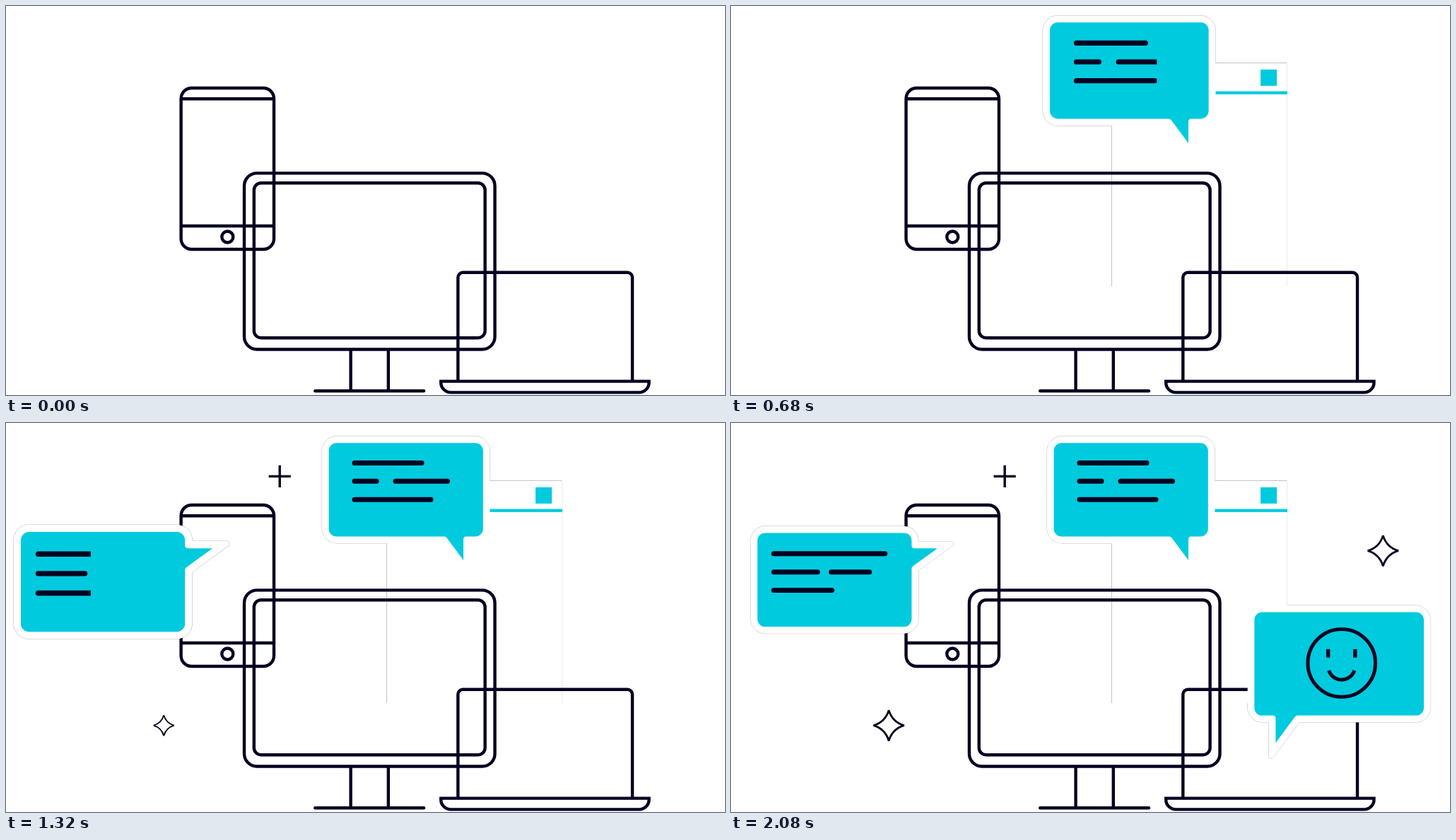
Animation, 1017 px wide and 550 px high, one loop 6680 ms. Source, as an HTML page with a canvas:

```html
<!DOCTYPE html>
<html lang="en">
<head>
<meta charset="utf-8">
<title>Devices and messages</title>
<style>
html, body { margin: 0; width: 100%; height: 100%; overflow: hidden; background: #fff; }
canvas { display: block; }
</style>
</head>
<body>
<canvas id="stage" width="1017" height="550"></canvas>
<script>
const W = 1017, H = 550, LOOP = 6680, STEP = 40;
const INK = '#050020', CYAN = '#00cade', EDGE = 'rgba(0,0,0,.27)';
const BOLD = 4.4, TEXT = 7, RIM = 9.6, PITCH = 25.9;
const PANEL = { x: 538, w: 249, h: 317, rest: 81, high: 69, floor: 396 };
const ctx = document.getElementById('stage').getContext('2d');

const clamp = u => Math.min(1, Math.max(0, u));
const ramp = (t, a, b) => clamp((t - a) / (b - a));
const smooth = u => u * u * (3 - 2 * u);
const easeOut = u => 1 - Math.pow(1 - u, 2.4);
const mix = (a, b, u) => a + (b - a) * u;

// Eases from `from` to `over`, then settles at `to`.
function overshoot(t, start, rise, fall, from, over, to) {
  const peak = start + rise;
  return t < peak ? mix(from, over, easeOut(ramp(t, start, peak)))
                  : mix(over, to, smooth(ramp(t, peak, peak + fall)));
}
const popBubble = (t, start) => overshoot(t, start, 240, 200, 0, 1.084, 1);
const popSpark = (t, start, over) => overshoot(t, start, 135, 120, 0, over, 1);

function pen(width, cap = 'butt', join = 'miter') {
  ctx.strokeStyle = INK;
  ctx.lineWidth = width;
  ctx.lineCap = cap;
  ctx.lineJoin = join;
}

function line(x1, y1, x2, y2) {
  ctx.beginPath();
  ctx.moveTo(x1, y1);
  ctx.lineTo(x2, y2);
  ctx.stroke();
}

function arc(x, y, r, from = 0, to = 2 * Math.PI) {
  ctx.beginPath();
  ctx.arc(x, y, r, from, to);
  ctx.stroke();
}

function box(x, y, w, h, r) {
  ctx.beginPath();
  ctx.roundRect(x, y, w, h, r);
  ctx.stroke();
}

function scaled(x, y, s, draw) {
  if (s <= 0) return;
  ctx.save();
  ctx.translate(x, y);
  ctx.scale(s, s);
  ctx.translate(-x, -y);
  draw();
  ctx.restore();
}

function drawPanel(top) {
  const { x, w, h, floor } = PANEL;
  ctx.save();
  ctx.beginPath();
  ctx.rect(0, 0, W, floor);
  ctx.clip();
  ctx.fillStyle = '#c4c4c4';
  ctx.fillRect(x, top, 1, h);
  ctx.fillRect(x, top, w, 1);
  ctx.fillStyle = '#ebebeb';
  ctx.fillRect(x + w - 1, top, 1, h);
  ctx.fillRect(x, top + h - 1, w, 1);
  ctx.fillStyle = CYAN;
  ctx.fillRect(x, top + 40.6, w, 4.3);
  ctx.fillRect(749, top + 9.9, 23, 23);
  ctx.restore();
}

function drawPhone(t) {
  const hop = 7 * smooth(ramp(t, 900, 1040)) * (1 - smooth(ramp(t, 1040, 1180)));
  const x = 247.6, w = 131.4, y = 116 - hop;
  pen(BOLD);
  box(x, y, w, 228, 15);
  for (const dy of [15.2, 195]) line(x, y + dy, x + w, y + dy);
  arc(x + w / 2, y + 210.5, 8);
}

function drawMonitor() {
  pen(BOLD);
  box(337, 236.4, 354.5, 249.1, 18);
  box(350.8, 250.2, 326.8, 219, 10);
  for (const x of [487.6, 540.8]) line(x, 485, x, 544);
  pen(BOLD, 'round');
  line(437.3, 544.2, 591, 544.2);
}

function drawLaptop() {
  const base = 530.6;
  pen(BOLD);
  ctx.beginPath();
  ctx.moveTo(639.3, base);
  ctx.arcTo(639.3, 376.8, 886, 376.8, 7);
  ctx.arcTo(886, 376.8, 886, base, 7);
  ctx.lineTo(886, base);
  ctx.stroke();
  box(615.2, base, 294.3, 15.8, [0, 0, 14, 14]);
}

// `root` is where the slanted side of the tail meets the box.
// Rows alternate dash and gap lengths.
const bubbles = [
  { start: 320, box: [456.6, 28.2, 674.8, 160.4], tip: [647, 194], root: 622,
    text: [489.5, 56.4], rows: [[102], [38, 20, 80.5], [115]] },
  { start: 1125, box: [37.4, 155.4, 255.5, 288.1], tip: [292, 177.2], root: 203.8, side: 'right',
    text: [57, 184.8], rows: [[164.3], [69, 12.3, 61], [89.2]] },
  { start: 1423, box: [740.3, 267.6, 980, 413.6], tip: [770.4, 452.3], root: 799,
    text: [0, 0], rows: [] }
];
const BODY_RADIUS = { box: 11, root: 4, tip: 0 };
const RIM_RADIUS = { box: 21, root: 1, tip: 3.5 };

function outline({ box: [l, t, r, b], tip: [x, y], root, side }) {
  const right = side === 'right';
  const tail = right ? [[r, y, 'root'], [x, y, 'tip'], [r, root, 'root']]
                     : [[x, b, 'root'], [x, y, 'tip'], [root, b, 'root']];
  if (!right && root > x) tail.reverse();
  const pts = [[l, t, 'box'], [r, t, 'box'], [r, b, 'box'], [l, b, 'box']];
  pts.splice(right ? 2 : 3, 0, ...tail);
  return pts;
}

// Moves every side of a clockwise polygon outward by d.
function grow(pts, d) {
  const n = pts.length;
  const normals = pts.map(([x, y], i) => {
    const [nx, ny] = pts[(i + 1) % n];
    const len = Math.hypot(nx - x, ny - y);
    return [(ny - y) / len, (x - nx) / len];
  });
  return pts.map(([x, y, kind], i) => {
    const [ax, ay] = normals[(i + n - 1) % n], [bx, by] = normals[i];
    const k = d / (1 + ax * bx + ay * by);
    return [x + k * (ax + bx), y + k * (ay + by), kind];
  });
}

function trace(pts, radius) {
  const n = pts.length, a = pts[0], z = pts[n - 1];
  ctx.beginPath();
  ctx.moveTo((a[0] + z[0]) / 2, (a[1] + z[1]) / 2);
  pts.forEach(([x, y, kind], i) => {
    const q = pts[(i + 1) % n];
    ctx.arcTo(x, y, q[0], q[1], radius[kind]);
  });
  ctx.closePath();
}

function drawText({ text: [x, y], rows, start }, t) {
  const widths = rows.map(row => row.reduce((a, b) => a + b, 0));
  ctx.beginPath();
  ctx.rect(0, 0, x + (Math.max(0, ...widths) + 1) * ramp(t, start, start + 440), H);
  ctx.clip();
  pen(TEXT, 'round');
  rows.forEach((row, i) => {
    let at = x;
    row.forEach((len, j) => {
      const ly = y + i * PITCH;
      if (j % 2 === 0) line(at + TEXT / 2, ly, at + len - TEXT / 2, ly);
      at += len;
    });
  });
}

function drawBubble(t, b, top) {
  const s = popBubble(t, b.start);
  const body = outline(b), rim = grow(body, RIM);
  // The rim's edge does not show over the white panel.
  ctx.save();
  ctx.beginPath();
  ctx.rect(0, 0, W, H);
  ctx.rect(PANEL.x, top, PANEL.w, Math.max(0, PANEL.floor - top));
  ctx.clip('evenodd');
  scaled(...b.tip, s, () => {
    trace(rim, RIM_RADIUS);
    ctx.strokeStyle = EDGE;
    ctx.lineWidth = 1;
    ctx.stroke();
  });
  ctx.restore();

  scaled(...b.tip, s, () => {
    trace(rim, RIM_RADIUS);
    ctx.fillStyle = '#fff';
    ctx.fill();
    trace(body, BODY_RADIUS);
    ctx.fillStyle = CYAN;
    ctx.fill();
    drawText(b, t);
  });
}

function drawSmile(t) {
  const x = 863.7, y = 339.4;
  scaled(x, y, overshoot(t, 1640, 160, 160, 0, 1.084, 1), () => {
    pen(5);
    arc(x, y, 47.8);
    arc(x, y + 4.6, 19, 0.32, Math.PI - 0.32);
    pen(5.4);
    for (const dx of [-19.1, 19.1]) line(x + dx, y - 19.6, x + dx, y - 7.8);
  });
}

function drawStar(x, y, s) {
  const r = 21.6, c = 5;
  scaled(x, y, s, () => {
    pen(2.8, 'butt', 'bevel');
    ctx.translate(x, y);
    ctx.beginPath();
    ctx.moveTo(r, 0);
    for (let i = 0; i < 4; i++) {
      ctx.quadraticCurveTo(c, c, 0, r);
      ctx.rotate(Math.PI / 2);
    }
    ctx.closePath();
    ctx.stroke();
  });
}

function drawPlus(t) {
  const x = 387.2, y = 75.4, r = 15.6;
  scaled(x, y, popSpark(t, 1060, 1.7), () => {
    pen(3.4);
    line(x - r, y, x + r, y);
    line(x, y - r, x, y + r);
  });
}

function draw(t) {
  const top = overshoot(t, 10, 310, 440, PANEL.floor + 1, PANEL.high, PANEL.rest);
  ctx.fillStyle = '#fff';
  ctx.fillRect(0, 0, W, H);
  drawPanel(top);
  drawPhone(t);
  drawMonitor();
  drawLaptop();
  for (const b of bubbles) drawBubble(t, b, top);
  drawSmile(t);
  drawPlus(t);
  drawStar(223.2, 427.7, popSpark(t, 1285, 1.3));
  drawStar(922.3, 180.7, popSpark(t, 1820, 1.3));
}

const begin = performance.now();
function tick() {
  const t = (performance.now() - begin) % LOOP;
  draw(Math.floor(t / STEP) * STEP);
  requestAnimationFrame(tick);
}
tick();
</script>
</body>
</html>
```
